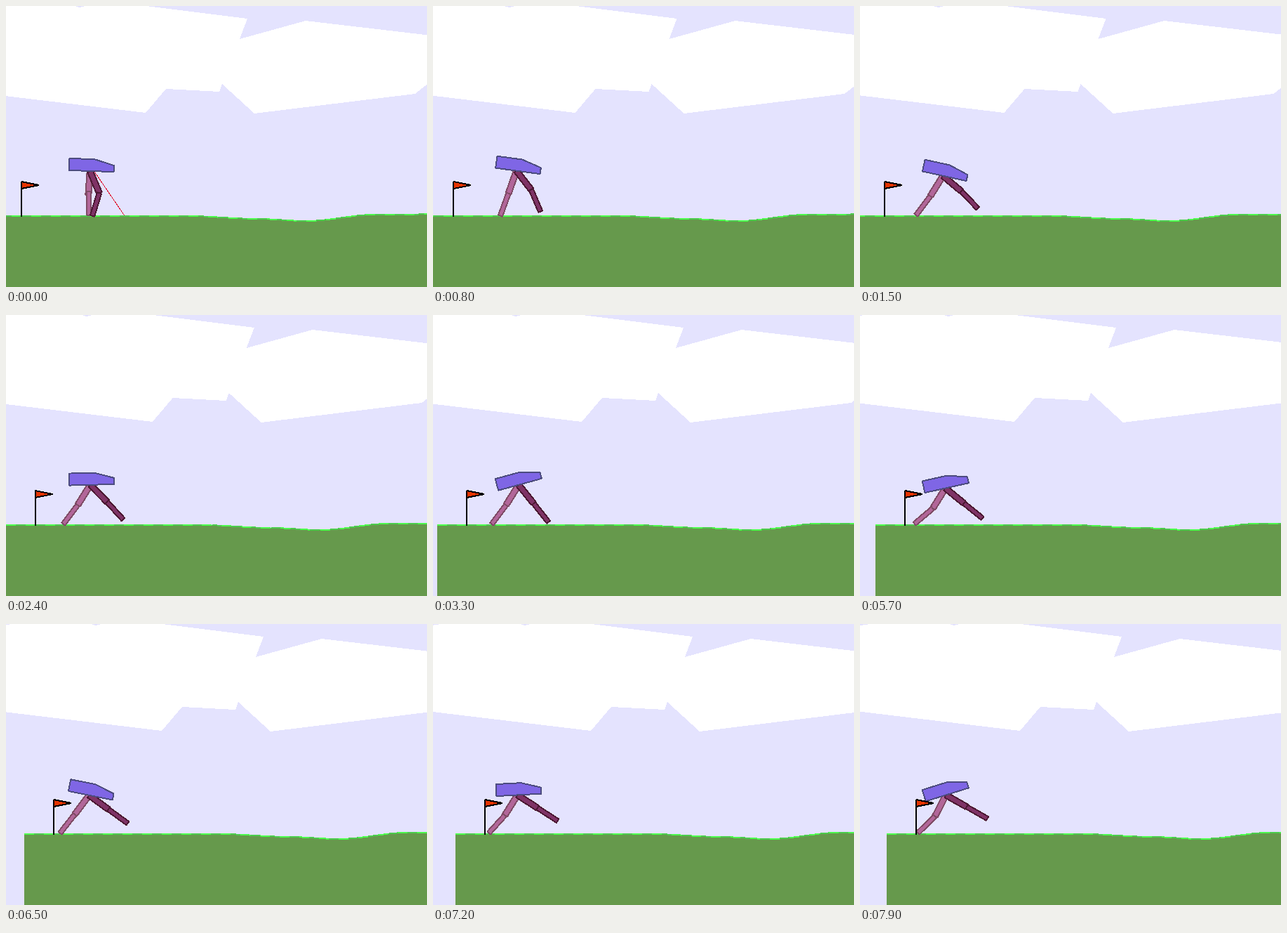
These frames come from a looping animation (600x400 px, 8 s). An HTML page:

```html
<!DOCTYPE html>
<html lang="en">
<head>
<meta charset="utf-8">
<title>Walker</title>
<style>
  html, body { margin: 0; width: 100%; height: 100%; overflow: hidden; background: #e4e3fe; }
  svg { display: block; shape-rendering: crispEdges; stroke-width: 2; stroke-linejoin: bevel; }
  #cloud { fill: #fff; }
  #soil { fill: #66994c; }
  #turf { fill: none; }
  #ray { stroke: #e01030; stroke-width: 1; }
  #pale { fill: #b26699; stroke: #7f4c66; }
  #dark { fill: #7f3366; stroke: #4c1933; }
  #hull { fill: #7f66e5; stroke: #4c4c7f; }
  #flag { fill: #e63300; stroke: #000; }
</style>
</head>
<body>
<svg width="600" height="400" viewBox="0 0 600 400">
  <polygon id="cloud" points="-60,6 -29,2 -14,0 -14,-9 98,-9 98,0 105,2 113,0 113,-11 200,0 344,18 333,47
    427,21 640,46 640,80 583,125 354,153 308,111 304,122 228,118 199,152 -60,121"/>
  <g id="ground"><polygon id="soil"/><g id="turf"></g></g>
  <line id="ray"/>
  <g id="pale"><rect x="-4" width="8" height="34"/><rect class="shin" x="-3.2" width="6.4" height="34"/></g>
  <g id="dark"><rect x="-4" width="8" height="34"/><rect class="shin" x="-3.2" width="6.4" height="34"/></g>
  <polygon id="hull" points="-30,-9 6,-9 34,-1 34,8 -30,8"/>
  <path id="flag" d="M0 300V250L25 255L0 260"/>
</svg>
<script>
const LOOP = 8000, TICK = 100, STEP = 14, LEG = 34, FLOOR = 299.7, HULL_X = 120;
const $ = id => document.getElementById(id);
const sin = deg => Math.sin(deg * Math.PI / 180);
const cos = deg => Math.cos(deg * Math.PI / 180);

// step, height
const slopes = [[0, 299], [20, 299], [27, 303], [32, 306], [39, 297], [46, 296.3]];

// ms, camera x, hull tilt, pale thigh, pale knee bend, dark thigh
const poses = [
  [0,    20,  2,     -4,  -5, 23],
  [1500, 7,   12.3,  -32, 5,  50],
  [3300, -6,  -15.3, -32, 5,  39],
  [4700, -9,  7.1,   -54, 5,  35],
  [5700, -22, -12.5, -32, 18, 51],
  [6500, -26, 11.2,  -37, 1,  54],
  [7900, -38, -17.3, -27, 19, 60.5]
];

// Eases between the two rows around `at`; the first column is the position
function keyed(rows, at) {
  const i = Math.max(1, rows.findIndex(row => row[0] >= at));
  const a = rows[i - 1], b = rows[i];
  const u = (1 - Math.cos(Math.PI * (at - a[0]) / (b[0] - a[0]))) / 2;
  return a.map((v, k) => v + (b[k] - v) * u).slice(1);
}

function buildGround() {
  const last = slopes[slopes.length - 1][0];
  const pts = Array.from({ length: last + 1 }, (_, k) => [k * STEP, keyed(slopes, k)[0]]);
  $('soil').setAttribute('points', [...pts, [last * STEP, 420], [0, 420]].join(' '));
  $('turf').innerHTML = pts.slice(1).map((p, k) =>
    `<path d="M${pts[k]}L${p}" stroke="${k % 2 ? '#4ccc4c' : '#4cff4c'}"/>`).join('');
}

function place(el, x, y = 0, deg = 0) {
  el.setAttribute('transform', `translate(${x} ${y}) rotate(${deg})`);
}

// An overextended knee (negative bend) slips short
function makeLeg(id, thigh, bend) {
  const shin = thigh - bend, knee = LEG + Math.min(0, bend);
  return {
    drop: cos(thigh) * knee + cos(shin) * LEG + 3.2 * Math.abs(sin(shin)),
    draw(x, y) {
      place($(id), x, y, -thigh);
      place($(id).querySelector('.shin'), 0, knee, bend);
    }
  };
}

// Sensor ray swings back under the hull, then goes dark
function drawRay(ms, y) {
  const swing = 4 - ms / TICK, end = 298;
  const ray = $('ray');
  ray.style.display = swing < 0 ? 'none' : '';
  const ends = { x1: HULL_X, y1: y, x2: HULL_X + Math.tan(0.15 * swing) * (end - y), y2: end };
  for (const key in ends) ray.setAttribute(key, ends[key]);
}

function draw(ms) {
  const [camera, tilt, paleThigh, paleBend, darkThigh] = keyed(poses, ms);
  place($('cloud'), (20 - camera) / 2);
  place($('ground'), -camera);
  place($('flag'), 3 * STEP - camera);

  // The dark leg straightens soon after the start
  const legs = [makeLeg('pale', paleThigh, paleBend), makeLeg('dark', darkThigh, 40 * Math.exp(-ms / 800))];
  // The lowest foot rests on the ground and carries the hull
  const hipY = FLOOR - Math.max(...legs.map(leg => leg.drop));
  const hullY = hipY - 8 * cos(tilt);
  legs.forEach(leg => leg.draw(HULL_X - 8 * sin(tilt), hipY));
  place($('hull'), HULL_X, hullY, tilt);
  drawRay(ms, hullY);
}

buildGround();
const start = performance.now();
function tick() {
  const t = Math.max(0, performance.now() - start) % LOOP;
  draw(Math.floor(t / TICK) * TICK);
  requestAnimationFrame(tick);
}
tick();
</script>
</body>
</html>
```
